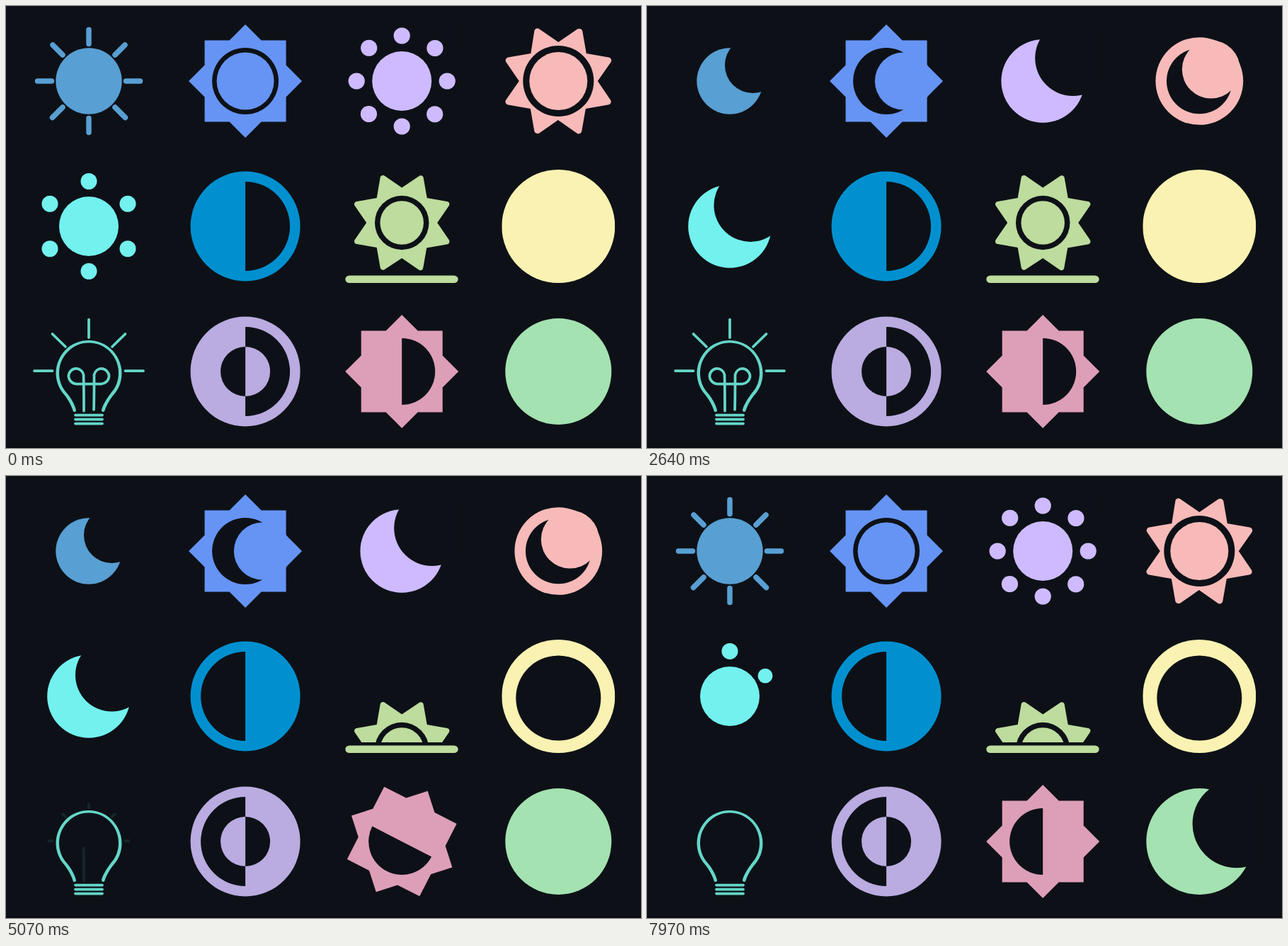
These frames come from a looping animation (897x624 px, 8000 ms). An HTML page:

```html
<!DOCTYPE html>
<html lang="en">
<head>
<meta charset="utf-8">
<title>Day and night toggles</title>
<style>
html, body { margin: 0; width: 100%; height: 100%; overflow: hidden; background: #0d1117; }
#stage { display: block; width: 897px; height: 624px; }
.night { fill: #0d1117; }
</style>
</head>
<body>
<svg id="stage" viewBox="0 0 897 624"></svg>
<script>
const LOOP = 8000, DUR = 500;
const stage = document.getElementById('stage');

function bezier(x1, y1, x2, y2) {
  const at = (a, b, s) => 3 * (1 - s) * (1 - s) * s * a + 3 * (1 - s) * s * s * b + s * s * s;
  return x => {
    if (x <= 0) return 0;
    if (x >= 1) return 1;
    let lo = 0, hi = 1;
    for (let i = 0; i < 30; i++) {
      const mid = (lo + hi) / 2;
      if (at(x1, x2, mid) < x) lo = mid; else hi = mid;
    }
    return at(y1, y2, lo);
  };
}
const spring = bezier(0, 0, 0.15, 1.25);
const snap = bezier(0, 0, 0, 1.25);
const leave = bezier(0, 0, 0.5, 1);
const soft = bezier(0.25, 0.1, 0.25, 1);

const mix = (a, b, p) => a + (b - a) * p;
const turn = deg => `rotate(${deg} 16 16)`;
const zoom = k => `translate(16 16) scale(${k}) translate(-16 -16)`;
const disc = (x, y, r, extra = '') => `<circle cx="${x}" cy="${y}" r="${r}" ${extra}/>`;
const cut = r => disc(99, 99, r, 'class="night cut"');
const put = (el, x, y) => { el.setAttribute('cx', x); el.setAttribute('cy', y); };

const squareStar = 'M27.5 11.5v-7h-7L16 0l-4.5 4.5h-7v7L0 16l4.5 4.5v7h7L16 32l4.5-4.5h7v-7L32 16Z';
const halfDisc = 'M16 .5a15.5 15.5 0 1 0 0 31a15.5 15.5 0 1 0 0-31Z';

const orbit = (n, dist, r, tag = '') => Array.from({ length: n }, (_, i) => {
  const a = i * 2 * Math.PI / n;
  return disc(16 + dist * Math.sin(a), 16 - dist * Math.cos(a), r, tag);
}).join('');

// Each icon: colour, time switched on, time switched back, markup and a pose.
// run(delay, length, ease) gives 0 for day and 1 for night.
const icons = [
  { // classic
    color: '#589fd3', on: 395, off: 5905,
    art: disc(16, 16, 9.34) +
      `<g class="rays" stroke="currentColor" stroke-width="1.5" stroke-linecap="round">
       <path d="M16 5.5v-4M16 30.5v-4M1.5 16h4M26.5 16h4M23.4 8.6l2.8-2.8M5.7 26.3l2.9-2.9M5.8 5.8l2.8 2.8M23.4 23.4l2.9 2.9"/></g>` + cut(7.906),
    pose(q, run, back) {
      const p = run(back ? 100 : 0, 400, spring), c = run(back ? 0 : 100, 400, spring);
      const rays = q('.rays');
      rays.setAttribute('transform', zoom(1 - p / 2) + turn(45 * p));
      rays.setAttribute('opacity', Math.max(0, Math.min(1, 1 - p)));
      put(q('.cut'), 34.5 - 12 * c, 1.5 + 10 * c);
    }
  },
  { // inner moon
    color: '#6694f5', on: 855, off: 6415,
    art: `<path class="star" d="${squareStar}"/>` + disc(16, 16, 9.39, 'class="night"') + disc(16, 16, 8.1, 'class="core"'),
    pose(q, run) {
      const p = run(0, DUR, spring);
      q('.star').setAttribute('transform', turn(90 * p));
      put(q('.core'), 16 + 4.86 * p, 16);
    }
  },
  { // expand
    color: '#cebaff', on: 1315, off: 6875,
    art: disc(16, 16, 8.4, 'class="core"') +
      `<g class="dots">${[0, 90, 180, 270].map(a =>
        `<g transform="${turn(a)}">${disc(16, 3.2, 2.32)}${disc(25.35, 6.7, 2.32)}</g>`).join('')}</g>` + cut(10.7),
    pose(q, run, back) {
      const p = run(back ? 175 : 0, 325, snap);
      const c = back ? run(0, 300, leave) : run(200, 300, snap);
      q('.core').setAttribute('r', 8.4 * (1 + 0.4 * p));
      q('.dots').setAttribute('transform', zoom(1 - p / 4));
      put(q('.cut'), 33.5 - 9 * c, -4.5 + 14 * c);
    }
  },
  { // within
    color: '#f7bab9', on: 1810, off: 7260,
    art: `<path class="star" d="M30.7 21.3 27.1 16l3.7-5.3c.4-.5.1-1.3-.6-1.4l-6.3-1.1-1.1-6.3c-.1-.6-.8-.9-1.4-.6L16 5l-5.4-3.7c-.5-.4-1.3-.1-1.4.6l-1 6.3-6.4 1.1c-.6.1-.9.9-.6 1.3L4.9 16l-3.7 5.3c-.4.5-.1 1.3.6 1.4l6.3 1.1 1.1 6.3c.1.6.8.9 1.4.6l5.3-3.7 5.3 3.7c.5.4 1.3.1 1.4-.6l1.1-6.3 6.3-1.1c.8-.1 1.1-.8.7-1.4Z"/>` +
      disc(16, 16, 10.9, 'class="ring"') + disc(16, 16, 10, 'class="night hole"') + disc(16, 16, 8.2, 'class="core"'),
    pose(q, run) {
      const p = run(0, DUR, spring), close = run(0, 150, leave), shift = 3.3 * run(0, 300, snap);
      const k = 1 + 0.13 * p;
      q('.star').setAttribute('transform', zoom(1 - 0.4 * p));
      q('.ring').setAttribute('r', 10.95 * k);
      q('.hole').setAttribute('r', mix(10, 8.2, close) * k);
      put(q('.core'), 16 + shift, 16 - shift);
    }
  },
  { // around
    color: '#72f1ef', on: 2235, off: 7680,
    art: disc(16, 16, 8.4, 'class="core"') + orbit(6, 12.7, 2.3, 'class="dot"') + cut(10.3),
    pose(q, run, back, all) {
      all('.dot').forEach((dot, i) => {
        const p = run(back ? 183 + 55 * i : 30 * i, 200, snap);
        dot.setAttribute('transform', zoom(1 - p / 2));
      });
      const p = back ? run(75, 175, snap) : run(150, 250, snap);
      q('.core').setAttribute('r', 8.4 * (1 + 0.4 * p));
      const c = back ? run(0, 300, leave) : run(200, 300, snap);
      const cutout = q('.cut');
      put(cutout, 34 - 12 * c, 36.5 - 14 * c);
      cutout.setAttribute('transform', turn(-90 * c));
    }
  },
  { // dark side
    color: '#0090d0', on: 2695,
    art: `<g class="spin"><path d="${halfDisc}"/><path class="night" d="M16 3.4a12.6 12.6 0 0 1 0 25.2Z"/></g>`,
    pose: halfTurn
  },
  { // horizon
    color: '#bddc9e', on: 3155,
    art: `<g class="sun"><path d="M29.3 19.8 26 15l3.3-4.8c.3-.5.1-1.1-.5-1.2l-5.7-1-1-5.7c-.1-.6-.8-.8-1.2-.5L16 5.1l-4.8-3.3c-.5-.4-1.2-.1-1.3.4L8.9 8 3.2 9c-.6.1-.8.8-.5 1.2L6 15l-3.3 4.8c-.3.5-.1 1.1.5 1.2l5.7 1 1 5.7c.1.6.8.8 1.2.5L16 25l4.8 3.3c.5.3 1.1.1 1.2-.5l1-5.7 5.7-1c.7-.1.9-.8.6-1.3Z"/>` +
      disc(16, 15, 7.65, 'class="night"') + disc(16, 15, 6.15) + `</g>
      <rect class="night" y="29" width="32" height="3"/><rect y="29.9" width="31.9" height="2.1" rx="1.2" ry="1.05"/>`,
    pose(q, run) {
      q('.sun').setAttribute('transform', `translate(0 ${16 * run(0, DUR, spring)})`);
    }
  },
  { // eclipse
    color: '#faf2b2', on: 3640,
    art: disc(16, 16, 16) + cut(12),
    pose(q, run) { put(q('.cut'), 48 - 32 * run(0, DUR, spring), 16.5); }
  },
  { // light bulb
    color: '#64d6c9', on: 4110,
    art: `<path d="M9.4 9.9c1.8-1.8 4.1-2.7 6.6-2.7 5.1 0 9.3 4.2 9.3 9.3 0 2.3-.8 4.4-2.3 6.1-.7.8-2 2.8-2.5 4.4 0 .2-.2.4-.5.4-.2 0-.4-.2-.4-.5v-.1c.5-1.8 2-3.9 2.7-4.8 1.4-1.5 2.1-3.5 2.1-5.6 0-4.7-3.7-8.5-8.4-8.5-2.3 0-4.4.9-5.9 2.5-1.6 1.6-2.5 3.7-2.5 6 0 2.1.7 4 2.1 5.6.8.9 2.2 2.9 2.7 4.9 0 .2-.1.5-.4.5h-.1c-.2 0-.4-.1-.4-.4-.5-1.7-1.8-3.7-2.5-4.5-1.5-1.7-2.3-3.9-2.3-6.1 0-2.3 1-4.7 2.7-6.5z"/>
      <g fill="none" stroke="currentColor" stroke-width=".75" stroke-linecap="round">
      <path d="M19.8 28.3h-7.6M19.8 29.5h-7.6M19.8 30.7h-7.6"/><g class="glow" stroke-dasharray="1 2">` +
      ['M14.6 27.1c0-3.4 0-6.8-.1-10.2-.2-1-1.1-1.7-2-1.7-1.2-.1-2.3 1-2.2 2.3.1 1 .9 1.9 2.1 2h7.2c1.1-.1 2-1 2.1-2 .1-1.2-1-2.3-2.2-2.3-.9 0-1.7.7-2 1.7 0 3.4 0 6.8-.1 10.2',
       'M16 6.4V1.3', 'M26.3 15.8h5.1', 'M22.6 9l3.7-3.6', 'M9.4 9 5.7 5.4', 'M5.7 15.8H.6']
        .map(d => `<path pathLength="1" d="${d}"/>`).join('') + '</g></g>',
    pose(q, run, back, all, t) {
      // the last trace of light lingers, then goes at once
      const p = Math.min(0.8, run(0, DUR, soft)), glow = q('.glow');
      glow.setAttribute('stroke-dashoffset', p);
      glow.setAttribute('opacity', t < 5320 ? 1 - 1.12 * p : 0);
    }
  },
  { // dark inner
    color: '#baabe0', on: 4490,
    art: `<g class="spin"><path d="${halfDisc}"/><path class="night" d="M16 3.4a12.6 12.6 0 0 1 0 25.2V23a7 7 0 0 0 0-14Z"/>
      <path class="night" d="M16 9a7 7 0 0 0 0 14Z"/></g>`,
    pose: halfTurn
  },
  { // half sun
    color: '#dd9eb8', on: 4965,
    art: `<g class="spin"><path d="${squareStar}"/><path class="night" d="M16 6.6a9.4 9.4 0 0 1 0 18.8Z"/></g>`,
    pose: halfTurn
  },
  { // simple
    color: '#a4e2b1', on: 5433,
    art: disc(16, 16, 15) + cut(12.45),
    pose(q, run) {
      const p = run(0, DUR, spring);
      put(q('.cut'), mix(45, 26.5, p), mix(7.2, 11, p));
    }
  }
];

function halfTurn(q, run) {
  q('.spin').setAttribute('transform', turn(180 * run(0, DUR, spring)));
}

stage.innerHTML = '<rect class="night" width="897" height="624"/><rect y="622" width="897" height="2" fill="#090b11"/>' +
  icons.map((icon, i) => `<svg class="icon" x="${37 + 221.1 * (i % 4)}" y="${26 + 205 * Math.floor(i / 4)}"
    width="160" height="160" viewBox="0 0 32 32" overflow="hidden" fill="${icon.color}" color="${icon.color}">${icon.art}</svg>`).join('');
stage.querySelectorAll('.icon').forEach((el, i) => { icons[i].el = el; });

function draw(t) {
  for (const { el, on, off, pose } of icons) {
    const back = off !== undefined && t >= off;
    const run = (delay, length, ease) => {
      const p = ease((t - (back ? off : on) - delay) / length);
      return back ? 1 - p : p;
    };
    pose(s => el.querySelector(s), run, back, s => el.querySelectorAll(s), t);
  }
}

const begin = performance.now();
function tick() {
  draw((performance.now() - begin) % LOOP);
  requestAnimationFrame(tick);
}
tick();
</script>
</body>
</html>
```
